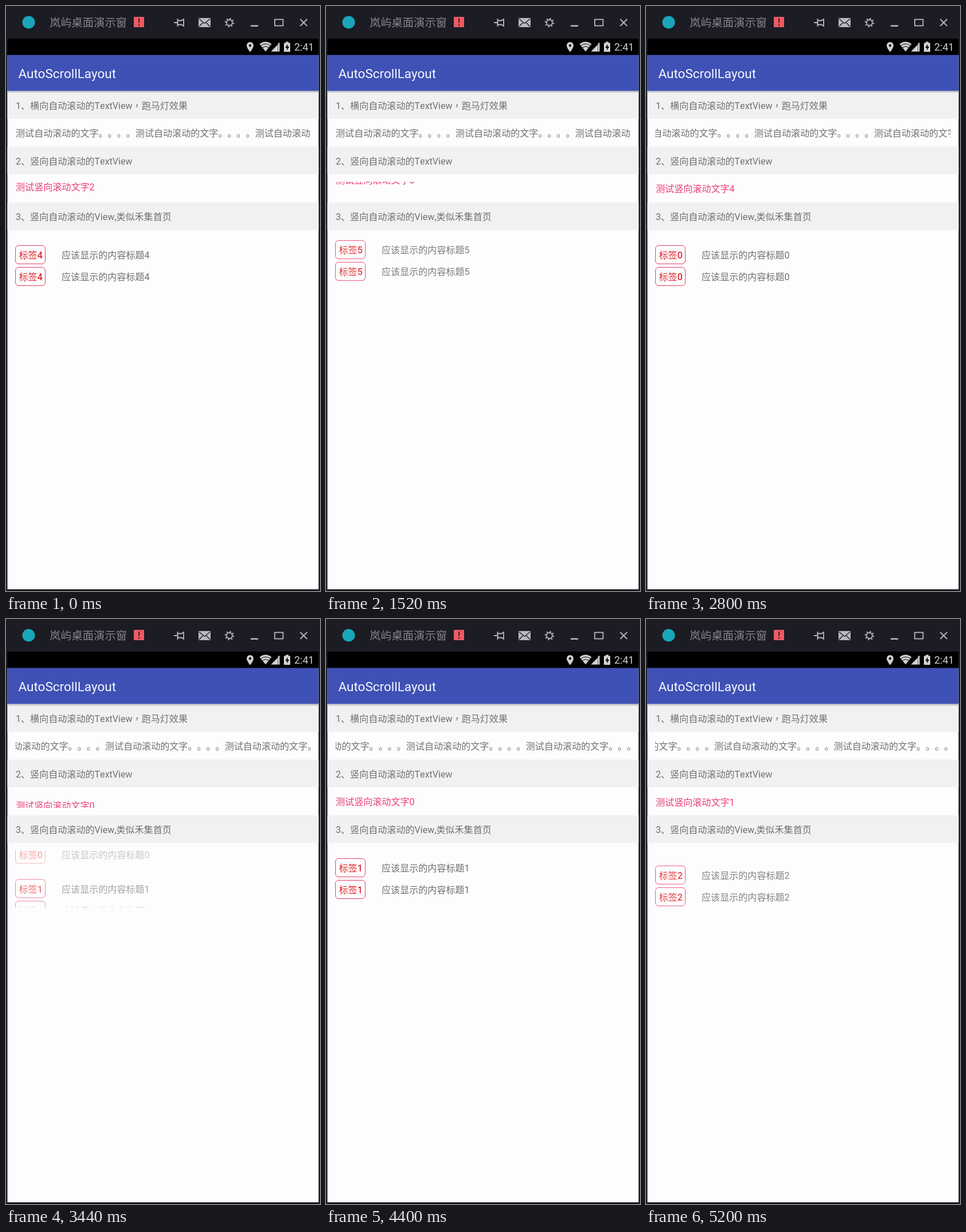
Animation, 548 px wide and 1022 px high, one loop 5.28 s. Source, as an HTML page:

```html
<!DOCTYPE html>
<html lang="zh-CN">
<head>
<meta charset="utf-8">
<title>AutoScrollLayout</title>
<style>
  html, body { margin: 0; width: 100%; height: 100%; overflow: hidden; background: #1c1c24; }
  svg { display: block; width: 548px; height: 1022px; }
  text {
    font: 16.07px Roboto, "Noto Sans CJK SC", "Noto Sans CJK", sans-serif;
    fill: #707070;
    white-space: pre;
    /* keep every punctuation mark a full em wide */
    text-spacing-trim: space-all;
    font-kerning: none;
    font-feature-settings: "chws" 0, "halt" 0, "palt" 0;
  }
  .mid { font-family: "Noto Sans CJK TC", "Noto Sans CJK", sans-serif; }
  .name { font-size: 19.3px; fill: #85858f; }
  .title { font-size: 22.5px; fill: #f6f7fc; font-kerning: normal; }
  .clock { font-size: 18px; fill: #cdcdcd; }
  .pink { fill: #ee3a7a; }
  .tag text { fill: #e3262b; font-weight: 500; }
  .tag rect { fill: none; stroke: #ea3f6a; stroke-width: 1; }
  .line { fill: none; stroke: #b9b9c1; stroke-width: 1.8; }
  .solid { fill: #b9b9c1; }
  .status { fill: #d2d2d2; }
</style>
</head>
<body>
<svg viewBox="0 0 548 1022">
  <defs>
    <clipPath id="rowClip"><rect x="16" y="198" width="516" height="47"/></clipPath>
    <clipPath id="textClip"><rect x="16" y="307" width="516" height="23"/></clipPath>
    <clipPath id="tagClip"><rect x="3" y="404" width="542" height="99.5"/></clipPath>
    <linearGradient id="shade" x2="0" y2="1">
      <stop stop-color="#b4b4ba"/><stop offset="1" stop-color="#f1f1f1"/>
    </linearGradient>
  </defs>

  <!-- window bar -->
  <rect width="548" height="1022" fill="#1c1c24"/>
  <circle cx="39.5" cy="28.5" r="11" fill="#1ba5ba"/>
  <text class="name" x="76" y="35.5">岚屿桌面演示窗</text>
  <rect x="223" y="19" width="18" height="18" fill="#ee5a62"/>
  <path d="M231 22h2.4l-.4 8h-1.6zM231 32h2.4v2.4h-2.4z" fill="#3a1c24"/>
  <path class="line" d="M293 29h6M299.5 22v14M300 25.5h6l4-2.5v12l-4-2.5h-6"/>
  <rect class="solid" x="336" y="21" width="21" height="16" rx="1"/>
  <path d="M337 22.5l9.5 8 9.5-8M337 36l6.5-7M356 36l-6.5-7" fill="none" stroke="#1c1c24" stroke-width="1.3"/>
  <circle class="line" cx="390" cy="29" r="5"/>
  <circle class="line" cx="390" cy="29" r="7.2" stroke-dasharray="2.6 3.055"/>
  <rect class="solid" x="427" y="33.5" width="13" height="2.5"/>
  <rect class="line" x="469" y="23.5" width="14.5" height="11"/>
  <path class="line" d="M513.5 23l12 12M525.5 23l-12 12"/>

  <!-- status bar -->
  <rect x="2.5" y="57" width="543" height="29" fill="#000"/>
  <path class="status" fill-rule="evenodd" d="M426 63a6 6 0 0 1 6 6c0 4-6 11.5-6 11.5s-6-7.5-6-11.5a6 6 0 0 1 6-6zm0 3.800a2.200 2.200 0 1 0 0 4.400 2.200 2.200 0 1 0 0-4.400z"/>
  <path class="status" d="M453 79.5L442.5 66.5Q453 58.5 463.5 66.5z"/>
  <path d="M444 69.5q9-6.5 18 0M447 73q6-4.5 12 0" fill="none" stroke="#000" stroke-width="1"/>
  <path d="M478 64v15.5h-15.5z" fill="#555"/>
  <path class="status" d="M474 68v11.5h-11.5z"/>
  <path d="M476 64.5v15" stroke="#d2d2d2" stroke-width="2.5"/>
  <path class="status" d="M488 62.5h5v2h3v15.5h-11v-15.5h3z"/>
  <path d="M491.5 66.5l-4 6.5h2.700v4.5l4-6.5h-2.700z" fill="#000"/>
  <text class="clock" x="503" y="78">2:41</text>

  <!-- app -->
  <rect x="2.5" y="86" width="543" height="933" fill="#fdfdfd"/>
  <g fill="#f1f1f1">
    <rect x="2.5" y="148" width="543" height="49"/>
    <rect x="2.5" y="245.5" width="543" height="48.5"/>
    <rect x="2.5" y="343" width="543" height="48.5"/>
  </g>
  <rect x="2.5" y="85.5" width="543" height="63" fill="#3f51b5"/>
  <rect x="2.5" y="148.5" width="543" height="4" fill="url(#shade)"/>
  <text class="title" x="21.5" y="125.5">AutoScrollLayout</text>
  <text x="17" y="179.5">1、横向自动滚动的TextView<tspan class="mid" lang="zh-TW">，</tspan>跑马灯效果</text>
  <text x="17" y="276.5">2、竖向自动滚动的TextView</text>
  <text x="17" y="373.5">3、竖向自动滚动的View,类似禾集首页</text>

  <g clip-path="url(#rowClip)"><text id="marquee" x="17" y="227.5"></text></g>
  <g clip-path="url(#textClip)">
    <text id="oldText" class="pink" x="17" y="324.7"></text>
    <text id="newText" class="pink" x="17" y="324.7"></text>
  </g>
  <g clip-path="url(#tagClip)"><g id="oldTags"></g><g id="newTags"></g></g>
</svg>

<script>
const LOOP = 5280, STEP = 80, MOVE = 700;
const TEXT_H = 48.5, TAG_H = 98;

// start times of each flip: [text, tags]
const flips = [[-110, 10], [1257, 1384], [2920, 3032], [4560, 4664]];

// marquee offset: [ms, px], slower while a flip runs
const scroll = [[0, 0], [1600, 0], [2080, 10], [2160, 13], [2800, 37], [2900, 41],
                [3440, 53], [3720, 60], [4400, 86], [4560, 92], [5280, 109]];

const el = id => document.getElementById(id);
const shift = (node, x, y) => node.setAttribute("transform", `translate(${x} ${y})`);
const clamp = v => Math.min(1, Math.max(0, v));
const ease = v => (1 - Math.cos(Math.PI * clamp(v))) / 2;

el("marquee").textContent = "测试自动滚动的文字。。。。".repeat(4);

const tagRow = (n, y) => `<g class="tag"><rect x="16.5" y="${y}" width="52" height="32" rx="5.5"/>
  <text x="22.5" y="${y + 22.7}">标签${n}</text></g><text x="97" y="${y + 22.7}">应该显示的内容标题${n}</text>`;

function setText(node, n, y) {
  node.textContent = "测试竖向滚动文字" + n;
  shift(node, 0, y);
}

function setTags(node, n, y, alpha) {
  if (node.dataset.n !== String(n)) {
    node.dataset.n = n;
    node.innerHTML = tagRow(n, 418.5) + tagRow(n, 456.5);
  }
  shift(node, 0, y);
  node.setAttribute("opacity", alpha);
}

function marqueeAt(t) {
  const i = scroll.findIndex(p => p[0] > t);
  const [t0, x0] = scroll[i - 1], [t1, x1] = scroll[i];
  return x0 + (x1 - x0) * (t - t0) / (t1 - t0);
}

function draw(t) {
  shift(el("marquee"), -marqueeAt(t), 0);

  const k = flips.filter(f => f[0] <= t).length - 1;
  const p = ease((t - flips[k][0]) / MOVE);
  setText(el("oldText"), (k + 2) % 5, -TEXT_H * p);
  setText(el("newText"), (k + 3) % 5, TEXT_H * (1 - p));

  const q = ease((t - flips[k][1]) / MOVE);
  setTags(el("oldTags"), (k + 4) % 6, -TAG_H * q, 1 - q);
  setTags(el("newTags"), (k + 5) % 6, TAG_H * (1 - q), q);
}

const begin = performance.now();
function tick() {
  const t = (performance.now() - begin) % LOOP;
  draw(Math.floor(t / STEP) * STEP);
  requestAnimationFrame(tick);
}
tick();
</script>
</body>
</html>
```
